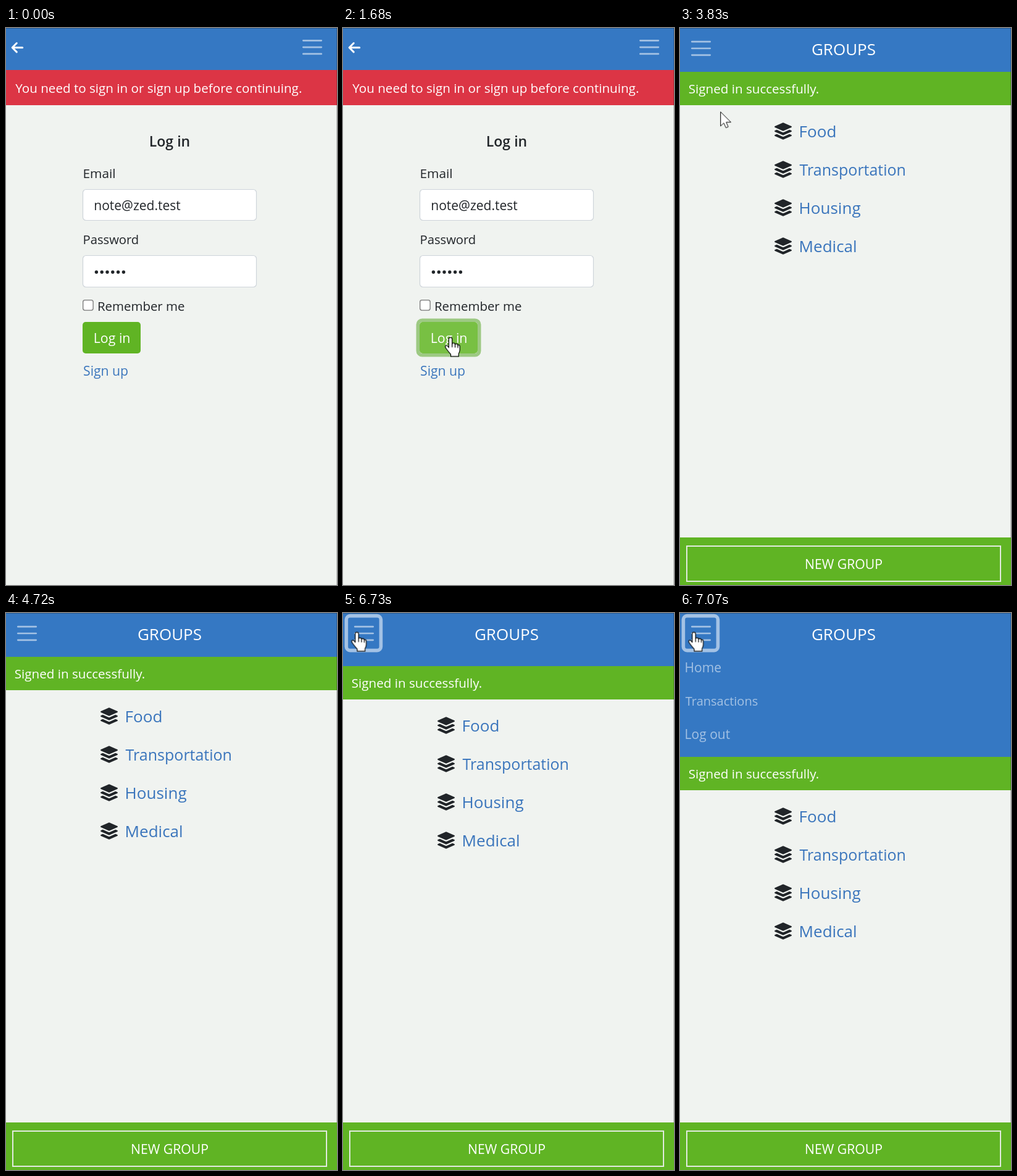
Animation, 536 px wide and 902 px high, one loop 8000 ms. Source, as an HTML page:

```html
<!DOCTYPE html>
<html lang="en">
<head>
<meta charset="utf-8">
<title>Sign in and groups</title>
<style>
html, body { margin: 0; width: 100%; height: 100%; overflow: hidden; background: #f0f3f0; }
svg { display: block; width: 536px; height: 902px; font: 20.6px "Open Sans", "Noto Sans", sans-serif; }
text { fill: #212529; white-space: pre; }
.white { fill: #fff; }
.link { fill: #3a75bc; }
.group { font-size: 26px; }
.menu { fill: #fff; fill-opacity: .55; font-size: 21px; }
.mid { text-anchor: middle; }
.blue { fill: #3578c3; }
.green { fill: #60b424; }
.bars { fill: none; stroke: #fff; stroke-opacity: .55; stroke-width: 2.7; stroke-linecap: round; }
.field { fill: #fff; stroke: #ced4da; stroke-width: 1.2; }
.pointer { fill: #fff; stroke: #000; stroke-width: 1.2; stroke-linejoin: round; }

.anim { animation: 8s step-end infinite; }
#groups { animation-name: groups; }
#icons { animation-name: icons; }
#page { animation-name: page; }
#toggleRing { animation-name: toggle-ring; }
#footFill { animation-name: foot-fill; }
#footText { animation-name: foot-text; }
#footLine { animation-name: foot-line; }
#loginBtn { animation-name: login-btn; }
#loginRing { animation-name: login-ring; }
#signUp { animation-name: sign-up; }
#transport { animation-name: transport; font-size: 25px; }
#cursor { animation-name: cursor; }
#arrow { animation-name: arrow; stroke-width: 1; }
#hand { animation-name: hand; }

@keyframes groups { 0% { opacity: 0 } 37.75%, 100% { opacity: 1 } }
@keyframes icons { 0% { opacity: 0 } 38.62%, 100% { opacity: 1 } }
@keyframes foot-fill { 0% { opacity: .42 } 38.62% { opacity: .86 } 39.5%, 100% { opacity: 1 } }
@keyframes foot-text { 0% { fill: #9c7cb8 } 38.62% { fill: #e9e0f0 } 39.5%, 100% { fill: #fff } }
@keyframes foot-line { 0% { opacity: 1 } 38.62%, 100% { opacity: 0 } }
@keyframes login-btn { 0% { fill: #60b424 } 15.85%, 100% { fill: #78c043 } }
@keyframes login-ring { 0% { opacity: 0 } 21%, 100% { opacity: 1 } }
@keyframes sign-up { 0% { fill: #3a75bc } 8.25% { fill: #275a94 } 13%, 100% { fill: #3a75bc } }
@keyframes transport { 0% { fill: #3a75bc } 70.62% { fill: #275a94 } 71.5%, 100% { fill: #3a75bc } }
@keyframes toggle-ring { 0% { opacity: 0 } 84.12%, 100% { opacity: 1 } }
@keyframes page {
  0% { transform: none }
  84.12% { transform: translateY(15px) }
  85% { transform: translateY(83px) }
  85.87% { transform: translateY(133.5px) }
  86.75% { transform: translateY(152px) }
  87.5% { transform: translateY(160px) }
  88.37%, 100% { transform: translateY(162px) }
}
@keyframes arrow {
  0% { opacity: 0 }
  7.5% { opacity: 1 }
  8.25% { opacity: 0 }
  33.62% { opacity: 1 }
  59% { opacity: 0 }
  71.5% { opacity: 1 }
  78.25%, 100% { opacity: 0 }
}
@keyframes hand {
  0% { opacity: 0 }
  8.25% { opacity: 1 }
  33.62% { opacity: 0 }
  70.62% { opacity: 1 }
  71.5% { opacity: 0 }
  78.25%, 100% { opacity: 1 }
}
@keyframes cursor {
  0% { transform: translate(327px, 655px) }
  8.25% { transform: translate(188px, 560px) }
  10.75% { transform: translate(188px, 560px); animation-timing-function: steps(12, jump-start) }
  21% { transform: translate(174px, 500.5px) }
  33.62% { transform: translate(174px, 500px) }
  43.62% { transform: translate(130px, 345px) }
  44.5% { transform: translate(76px, 167px) }
  47.87% { transform: translate(76px, 167px); animation-timing-function: steps(5, jump-start) }
  52.53% { transform: translate(22px, 8px); animation-timing-function: steps(5, jump-start) }
  57.19% { transform: translate(40px, 26px) }
  70.62% { transform: translate(210px, 236px) }
  71.5% { transform: translate(164px, 252px) }
  74% { transform: translate(164px, 252px); animation-timing-function: steps(5, jump-start) }
  78.25% { transform: translate(8px, 52px); animation-timing-function: steps(2, jump-start) }
  79.86% { transform: translate(12px, 4px) }
  79.87% { transform: translate(18px, 28px) }
  80.75% { transform: translate(18px, 28px); animation-timing-function: steps(4, jump-start) }
  84.12%, 100% { transform: translate(22.5px, 30.5px) }
}
</style>
</head>
<body>
<svg viewBox="0 0 536 902">
  <defs>
    <path id="sheet" d="M27.3 13.1l-3.1-1.4-8.9 4q-1.3.6-2.6 0L3.8 11.7.7 13.1q-1.3.9 0 1.8l12.6 5.7q.7.3 1.4 0l12.6-5.7q1.3-.9 0-1.8z"/>
    <g id="layers" fill="#212529">
      <path d="M14.7.4 27.3 6.1q1.3.9 0 1.8L14.7 13.6q-.7.3-1.4 0L.7 7.9q-1.3-.9 0-1.8L13.3.4q.7-.3 1.4 0z"/>
      <use href="#sheet"/>
      <use href="#sheet" y="7"/>
    </g>
    <path id="bars" class="bars" d="M1.3 0H30.7M1.3 10.8H30.7M1.3 21.6H30.7"/>
  </defs>

  <!-- Login screen -->
  <g>
    <rect width="536" height="902" fill="#f0f3f0"/>
    <rect class="blue" width="536" height="68"/>
    <path d="M17.3 24.5 10.2 31.7l7.1 7.2M10.6 31.7H26.7" fill="none" stroke="#fff" stroke-width="3" stroke-linecap="round" stroke-linejoin="round"/>
    <use href="#bars" x="480" y="20.3"/>
    <rect y="68" width="536" height="57" fill="#dc3545"/>
    <text class="white" x="15.3" y="105">You need to sign in or sign up before continuing.</text>
    <text class="mid" x="265" y="192" font-size="23" font-weight="600">Log in</text>
    <text x="124.5" y="243" font-size="20.8">Email</text>
    <rect class="field" x="124.5" y="261.5" width="281" height="50" rx="5"/>
    <text x="142.3" y="295" font-size="21">note@zed.test</text>
    <text x="124.5" y="350" font-size="20.2">Password</text>
    <rect class="field" x="124.5" y="368.5" width="281" height="51" rx="5"/>
    <path d="M146.4 395.3h45" stroke="#212529" stroke-width="5.4" stroke-linecap="round" stroke-dasharray="0 8.8"/>
    <rect x="124.7" y="440.7" width="16.4" height="16.4" rx="3" fill="#fff" stroke="#767676" stroke-width="1.3"/>
    <text x="148" y="458" font-size="20.4">Remember me</text>
    <rect id="loginRing" class="anim" x="121.3" y="473.3" width="99.4" height="56.4" rx="7" fill="none" stroke="#9dc983" stroke-width="5.6"/>
    <rect id="loginBtn" class="anim" x="124" y="476" width="94" height="51" rx="5"/>
    <text class="white" x="141.8" y="510" font-size="21.3">Log in</text>
    <text id="signUp" class="anim" x="125" y="563" font-size="21.2">Sign up</text>
    <path d="M535.5 0V902" stroke="#000" stroke-opacity=".22"/>
  </g>

  <!-- Groups screen -->
  <g id="groups" class="anim">
    <rect class="blue" width="536" height="240"/>
    <text class="menu" x="7.6" y="96">Home</text>
    <text class="menu" x="8.8" y="150" style="font-size:20px">Transactions</text>
    <text class="menu" x="7.6" y="204">Log out</text>
    <g id="page" class="anim">
      <rect class="blue" y="60" width="536" height="11.5"/>
      <rect class="green" y="71" width="536" height="54"/>
      <rect y="125" width="536" height="780" fill="#f0f3f0"/>
      <text class="white" x="13.8" y="106">Signed in successfully.</text>
      <g id="icons" class="anim">
        <use href="#layers" x="153" y="153"/>
        <use href="#layers" x="153" y="215"/>
        <use href="#layers" x="153" y="277"/>
        <use href="#layers" x="153" y="339"/>
      </g>
      <text class="link group" x="192.6" y="177">Food</text>
      <text id="transport" class="anim" x="193.5" y="239">Transportation</text>
      <text class="link group" x="192.6" y="301">Housing</text>
      <text class="link group" x="192.6" y="363">Medical</text>
    </g>
    <use href="#bars" x="18" y="22.2"/>
    <text class="white mid" x="265" y="44" font-size="26">GROUPS</text>
    <rect id="toggleRing" class="anim" x="5.4" y="4.6" width="56" height="56" rx="6" fill="none" stroke="#a3c2e5" stroke-width="5.6"/>
    <path d="M535.5 0V825" stroke="#000" stroke-opacity=".22"/>
    <rect y="825" width="536" height="77" fill="#f0f3f0"/>
    <rect id="footFill" class="anim green" y="825" width="536" height="77"/>
    <path id="footLine" class="anim" d="M0 825.5H536" stroke="#849c78"/>
    <rect x="11" y="839" width="508" height="57" fill="none" stroke="#e2eadf" stroke-width="2"/>
    <text id="footText" class="anim mid" x="265" y="876" font-size="21.2">NEW GROUP</text>
  </g>

  <path d="M0 .5H536" stroke="#000" stroke-opacity=".25"/>

  <g id="cursor" class="anim pointer">
    <path id="arrow" class="anim" d="M.5.6V23.6L5.7 18.7 9.2 26.4 12.9 24.8 9.6 17.3H17.2Z"/>
    <g id="hand" class="anim">
      <path d="M-2.7 3Q-2.7.6 0 .6T2.7 3V11q.3-1.3 2.2-1.3 2.3 0 2.6 2.2.4-1 2-1 2.4.1 2.5 2.4.5-.8 1.4-.7 1.8.2 1.8 3V21Q15 24 13.2 27V31.4H.5V28Q-3 24-7 18.5-9.6 15-7.5 13.8-5 12.8-2.7 17Z"/>
      <path d="M2.7 11V16.5M7.5 12V17M12 13.3V17.5" fill="none"/>
    </g>
  </g>
</svg>
</body>
</html>
```
